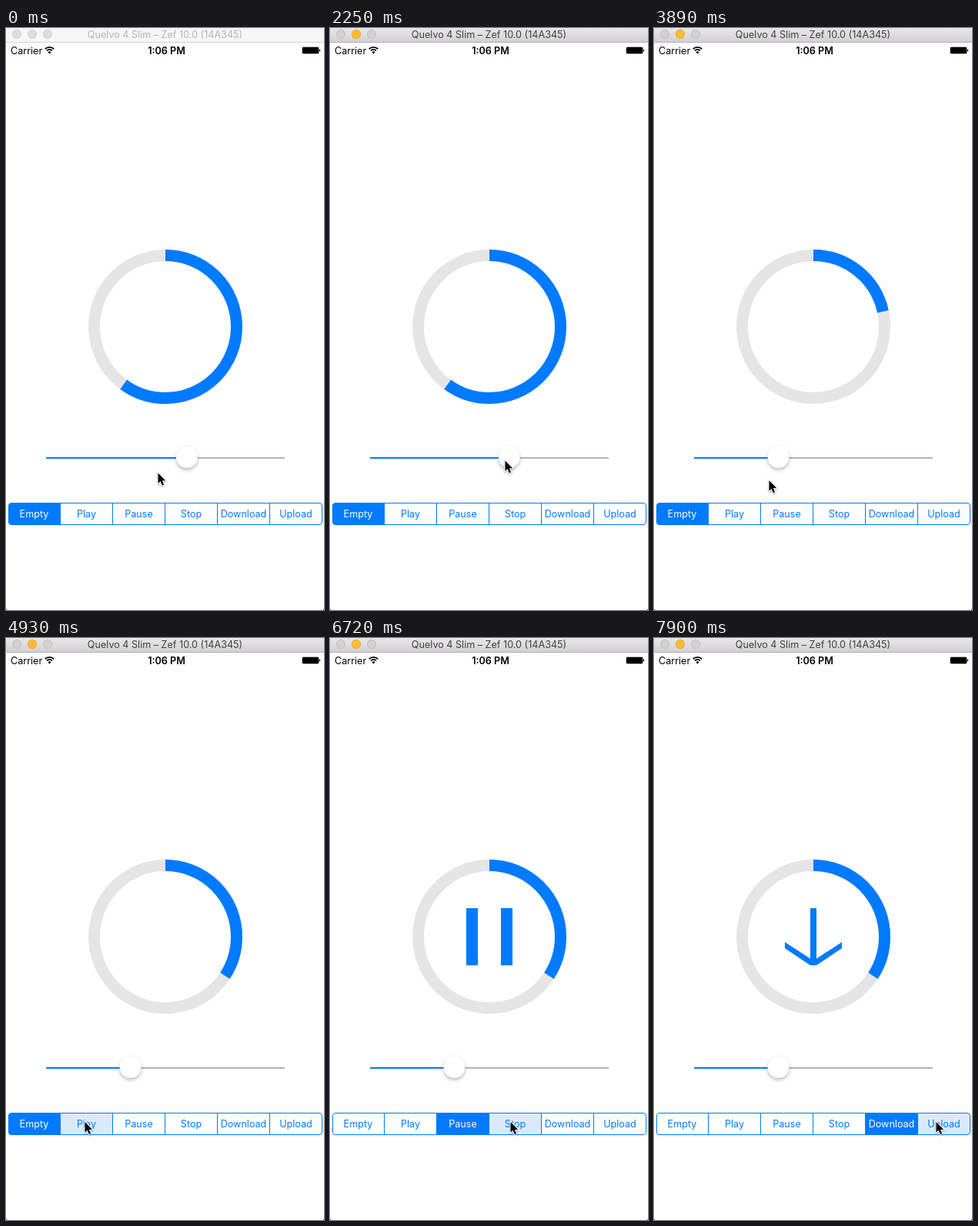
Recreate the animation shown at these times as an HTML page with a canvas. Size 413 by 754 pixels, loop 8 s.

```html
<!DOCTYPE html>
<html lang="en">
<head>
<meta charset="utf-8">
<title>Progress button demo</title>
<style>
  html, body { margin: 0; width: 100%; height: 100%; overflow: hidden; background: #fefefe; }
  canvas { display: block; width: 413px; height: 754px; }
</style>
</head>
<body>
<canvas id="stage"></canvas>
<script>
const W = 413, H = 754, LOOP = 8000, TICK = 149;
const BLUE = '#007aff', PAPER = '#fefefe', TINT = '#d9eaff';
const FONT = 'Inter, "Open Sans", sans-serif';
const LABELS = ['Empty', 'Play', 'Pause', 'Stop', 'Download', 'Upload'];
const SEG = { x: 3, y: 615, w: 68, h: 29 };
const CENTER = { x: 207, y: 387 };
const ICON = 74;

const canvas = document.getElementById('stage');
const ctx = canvas.getContext('2d');
const dpr = window.devicePixelRatio || 1;
canvas.width = W * dpr;
canvas.height = H * dpr;

// Ticks at which the pointer presses Play, Pause, Stop, Download and Upload
const TAPS = [33, 40, 45, 49, 53];
const TRAVEL = 4;
const DRAG = { from: 14, to: 25, grip: 4, lag: .43, ringLag: 1.75 };

const clamp = (v, lo, hi) => Math.min(hi, Math.max(lo, v));
const mix = (a, b, p) => a + (b - a) * p;
const smooth = p => p * p * (3 - 2 * p);
const buttonSpot = i => [102 + 66 * (i - 1), 626.5];

// Approach, slider drag left and right, then down to the buttons: [tick, x, y]
const ROUTE = [
  [0, 197, 576], [6, 235, 570], [7, 235, 570], [13, 231, 560], [14, 231, 560],
  [15, 227, 560], [20, 87, 553], [22, 66, 553], [25, 157.5, 555], [28, 132, 647],
  [TAPS[0], ...buttonSpot(1)]
];

function pointer(tick) {
  const done = TAPS.filter(t => t <= tick).length;
  if (done) {
    const p = smooth(clamp((tick - TAPS[done - 1]) / TRAVEL, 0, 1));
    const from = buttonSpot(done), to = buttonSpot(Math.min(done + 1, TAPS.length));
    return from.map((v, i) => mix(v, to[i], p));
  }
  const n = Math.max(1, ROUTE.findIndex(stop => stop[0] > tick));
  const [t0, x0, y0] = ROUTE[n - 1], [t1, x1, y1] = ROUTE[n];
  const p = (tick - t0) / (t1 - t0);
  return [mix(x0, x1, p), mix(y0, y1, p)];
}

// The thumb trails the pointer, the ring trails the thumb
const thumbX = tick => pointer(clamp(tick - DRAG.lag, DRAG.from, DRAG.to))[0] + DRAG.grip;
const progress = tick => (thumbX(tick - DRAG.ringLag) - 64) / 285;

function rect(x, y, w, h, color) {
  ctx.fillStyle = color;
  ctx.fillRect(x, y, w, h);
}

function disc(x, y, r, color) {
  ctx.fillStyle = color;
  ctx.beginPath();
  ctx.arc(x, y, r, 0, Math.PI * 2);
  ctx.fill();
}

function shape(points) {
  ctx.beginPath();
  points.forEach(([x, y]) => ctx.lineTo(x, y));
  ctx.closePath();
}

function rounded(x, y, w, h, r) {
  ctx.beginPath();
  ctx.roundRect(x, y, w, h, r);
}

function text(str, x, y, color, weight = 400, align = 'center') {
  ctx.font = `${weight} 12.6px ${FONT}`;
  ctx.textAlign = align;
  ctx.fillStyle = color;
  ctx.fillText(str, x, y);
}

function titleBar(active) {
  const g = ctx.createLinearGradient(0, 0, 0, 18);
  g.addColorStop(0, active ? '#e9e7e9' : '#f6f6f6');
  g.addColorStop(1, active ? '#d2d0d2' : '#f6f6f6');
  rect(0, 0, W, 18, g);
  rect(0, 18, W, 1, active ? '#b1afb1' : '#d2d2d2');
  for (let i = 0; i < 3; i++) {
    const lit = active && i === 1, x = 14 + 20 * i;
    disc(x, 8, 6, lit ? '#dfa023' : active ? '#bcbabc' : '#cecece');
    disc(x, 8, 5.2, lit ? '#ffbd2e' : active ? '#d2d0d2' : '#dcdcdc');
  }
  text('Quelvo 4 Slim – Zef 10.0 (14A345)', 206.5, 13, active ? '#404040' : '#b4b4b4');
}

function statusBar() {
  text('Carrier', 6, 34, '#000', 400, 'left');
  text('1:06 PM', 208.5, 34, '#000', 600);

  const a = -Math.PI / 2 - .78, b = -Math.PI / 2 + .78;
  ctx.strokeStyle = '#000';
  ctx.lineWidth = 1.8;
  for (const r of [8.2, 5]) {
    ctx.beginPath();
    ctx.arc(56.5, 33, r, a, b);
    ctx.stroke();
  }
  ctx.beginPath();
  ctx.moveTo(56.5, 33.5);
  ctx.arc(56.5, 33.5, 3, a, b);
  ctx.fill();

  ctx.strokeStyle = '#aaa';
  ctx.lineWidth = 1;
  rounded(384.5, 24.5, 22, 9, 2);
  ctx.stroke();
  rounded(385, 25, 21, 8, 1);
  ctx.fill();
  rect(407, 27.5, 1, 3, '#000');
}

function ring(value) {
  const arc = (part, color) => {
    ctx.strokeStyle = color;
    ctx.lineWidth = 15;
    ctx.beginPath();
    ctx.arc(CENTER.x, CENTER.y, 92.5, -Math.PI / 2, (part - .25) * Math.PI * 2);
    ctx.stroke();
  };
  arc(1, '#e5e5e5');
  arc(value, BLUE);
}

// Icons are drawn around the origin
const half = ICON / 2;
const icons = [
  () => {},
  () => { shape([[-22, -half], [half, 0], [-22, half]]); ctx.fill(); },
  () => [-30, 15].forEach(x => ctx.fillRect(x, -half, 15, ICON)),
  () => ctx.fillRect(-half, -half, ICON, ICON),
  () => {
    ctx.fillRect(-4, -half, 8, 70);
    shape([[-half, 7], [0, 31], [half, 7], [half, 15], [4, half], [-4, half], [-half, 15]]);
    ctx.fill();
  }
];

function icon(i) {
  ctx.save();
  ctx.translate(CENTER.x, CENTER.y);
  ctx.fillStyle = BLUE;
  icons[i]();
  ctx.restore();
}

function slider(x) {
  rect(52, 556, 310, 2, '#b4b4b4');
  rect(52, 556, x - 52, 2, BLUE);
  ctx.save();
  ctx.shadowColor = 'rgba(0,0,0,.26)';
  ctx.shadowBlur = 4 * dpr;
  ctx.shadowOffsetY = 2.5 * dpr;
  disc(x, 556, 14, '#fff');
  ctx.restore();
}

function segments(selected, pressed) {
  const { x, y, w, h } = SEG;
  const outline = () => rounded(x + .5, y + .5, w * LABELS.length - 1, h - 1, 3.5);
  ctx.save();
  outline();
  ctx.clip();
  LABELS.forEach((_, i) => {
    const left = x + i * w;
    if (i === selected) rect(left, y, w, h, BLUE);
    else if (i === pressed) rect(left, y, w, h, TINT);
    rect(left - 1, y, 1, h, BLUE);
  });
  ctx.restore();
  ctx.strokeStyle = BLUE;
  ctx.lineWidth = 1;
  outline();
  ctx.stroke();
  LABELS.forEach((label, i) =>
    text(label, x + (i + .5) * w - .5, 634, i === selected ? '#fff' : BLUE));
}

function arrow([x, y]) {
  ctx.save();
  ctx.translate(x + .5, y + .5);
  shape([[0, 0], [0, 13.6], [3.1, 10.8], [5.3, 16], [7.6, 15], [5.4, 10], [9.6, 9.7]]);
  ctx.shadowColor = 'rgba(0,0,0,.35)';
  ctx.shadowBlur = 2 * dpr;
  ctx.shadowOffsetY = dpr;
  ctx.strokeStyle = '#fff';
  ctx.lineWidth = 2;
  ctx.stroke();
  ctx.shadowColor = 'transparent';
  ctx.fillStyle = '#000';
  ctx.fill();
  ctx.restore();
}

function draw(t) {
  const tick = Math.floor(t / TICK);
  const selected = TAPS.filter(tap => tap < tick).length;
  ctx.setTransform(dpr, 0, 0, dpr, 0, 0);
  rect(0, 0, W, H, PAPER);
  titleBar(tick > DRAG.from);
  statusBar();
  ring(progress(tick));
  icon(selected);
  slider(thumbX(tick));
  segments(selected, TAPS.indexOf(tick) + 1);
  for (const x of [0, W - 1]) rect(x, H - 1, 1, 1, '#333');
  arrow(pointer(tick));
}

const start = performance.now();
function loop() {
  draw((performance.now() - start) % LOOP);
  requestAnimationFrame(loop);
}
loop();
</script>
</body>
</html>
```
